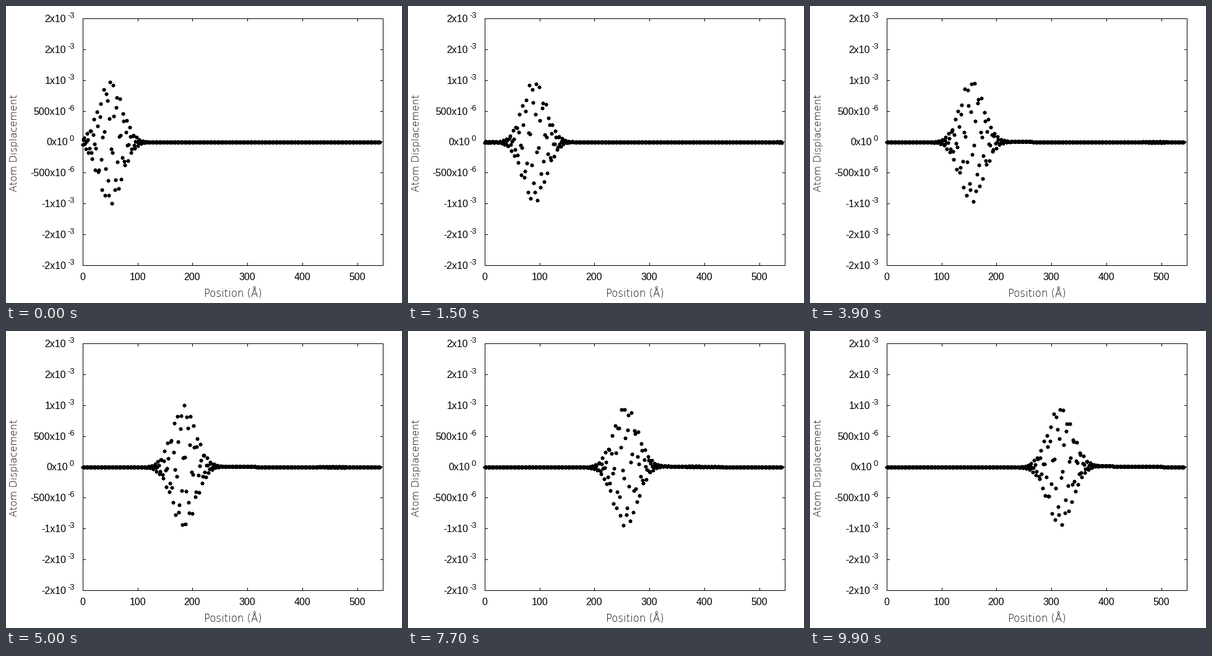
A matplotlib script that plays this animation: 640x480 px, repeating every 10000 ms.

```python
import numpy as np
import matplotlib.pyplot as plt
from matplotlib.animation import FuncAnimation
from matplotlib.collections import PolyCollection
from matplotlib.patches import Rectangle

W, H, FRAMES = 640, 480, 100
LEFT, RIGHT, TOP, BOTTOM = 124, 609, 20, 419

# One point per screen pixel, y pointing down.
fig = plt.figure(figsize=(W / 72, H / 72), dpi=72, facecolor="white")
ax = fig.add_axes([0, 0, 1, 1])
ax.set_xlim(0, W)
ax.set_ylim(H, 0)
ax.axis("off")


def block(x0, y0, x1, y1):
    """Fill the pixels from (x0, y0) to (x1, y1), both included."""
    ax.add_patch(Rectangle((x0, y0), x1 - x0 + 1, y1 - y0 + 1, fc="black",
                           lw=0, antialiased=False, snap=False))


def label(x, y, s, size=16, font="Liberation Sans", **kw):
    kw = {"ha": "center", "va": "baseline", **kw}
    ax.text(x, y, s, fontsize=size, family=font, color="black", **kw)


def draw_axes():
    for x in (LEFT, RIGHT):
        block(x, TOP, x, BOTTOM)
    for y in (TOP, BOTTOM):
        block(LEFT, y, RIGHT, y)
    for i in range(6):
        x = round(LEFT + 88.72 * i)
        block(x, BOTTOM - 4, x, BOTTOM)
        block(x, TOP, x, TOP + 4)
        label(x, 443, str(100 * i))
    ticks = [("2", "-3"), ("2", "-3"), ("1", "-3"), ("500", "-6"), ("0", "0"),
             ("-500", "-6"), ("-1", "-3"), ("-2", "-3"), ("-2", "-3")]
    for i, (mant, power) in enumerate(ticks):
        y = round(TOP + 49.875 * i - .01)
        block(LEFT, y, LEFT + 4, y)
        block(RIGHT - 4, y, RIGHT, y)
        x = 102.5 if power == "0" else 99
        label(x - 2, y + 6, mant + "x10", ha="right")
        label(x, y - 1, power, 12.8, ha="left")
    label(366.5, 470, "Position (Å)", 16.5, "DejaVu Sans", weight=200)
    label(18, 221.5, "Atom Displacement", 16, "DejaVu Sans", weight=200,
          rotation=90, rotation_mode="anchor")


# Wave packet on a chain of atoms.
N = 400
K = .91 * np.pi / 2      # phase per atom
START = 36.826           # packet centre, in atoms
SPEED = 1.976            # atoms per frame
OMEGA = 2.8195           # phase per frame
SIGMA = 15.6
n = np.arange(N)
xs = np.floor(124.3 + 1.2046 * n)


def bell(d):
    return np.exp(-d ** 2 / (2 * SIGMA ** 2))


def displacement(t):
    d = n - START - SPEED * t
    spread = 1 - .0035j * t
    env = np.exp(-d ** 2 / (2 * SIGMA ** 2 * spread)) / np.sqrt(abs(spread))
    u = 99.5 * np.real(env * np.exp(1j * (K * (n - START) + OMEGA * t)))
    # faint packet running the other way round the periodic chain
    b = (n - START + SPEED * t + N / 2) % N - N / 2
    u += .9 * bell(b) * np.cos(K * b - OMEGA * t)
    # lift carried by the packet and slow swell ahead of it
    u += 1.5 * (1 - np.exp(-t / 12)) * bell(d)
    swell = np.exp(-np.maximum(d, 0) / 60) / (1 + np.exp(-(d - 25) / 8))
    return u + 5 * t / FRAMES * swell


# Pixel disc whose rows are 1, 5, 5, 7, 5, 5, 1 wide.
corner = np.array([(0, -3), (1, -3), (1, -2), (3, -2), (3, 0), (4, 0)])
right = np.vstack([corner, corner[::-1] * [1, -1] + [0, 1]])
DISC = np.vstack([right, right[::-1] * [-1, 1] + [1, 0]])

draw_axes()
dots = PolyCollection([], facecolors="black", edgecolors="none", linewidths=0,
                      antialiaseds=False, zorder=5)
dots.set_snap(False)
ax.add_collection(dots, autolim=False)


def update(t):
    ys = np.floor(220.5 - displacement(t))
    dots.set_verts(np.column_stack([xs, ys])[:, None, :] + DISC)
    return dots,


anim = FuncAnimation(fig, update, frames=FRAMES, interval=100,
                     repeat=True, repeat_delay=0, blit=False)
plt.show()
```
